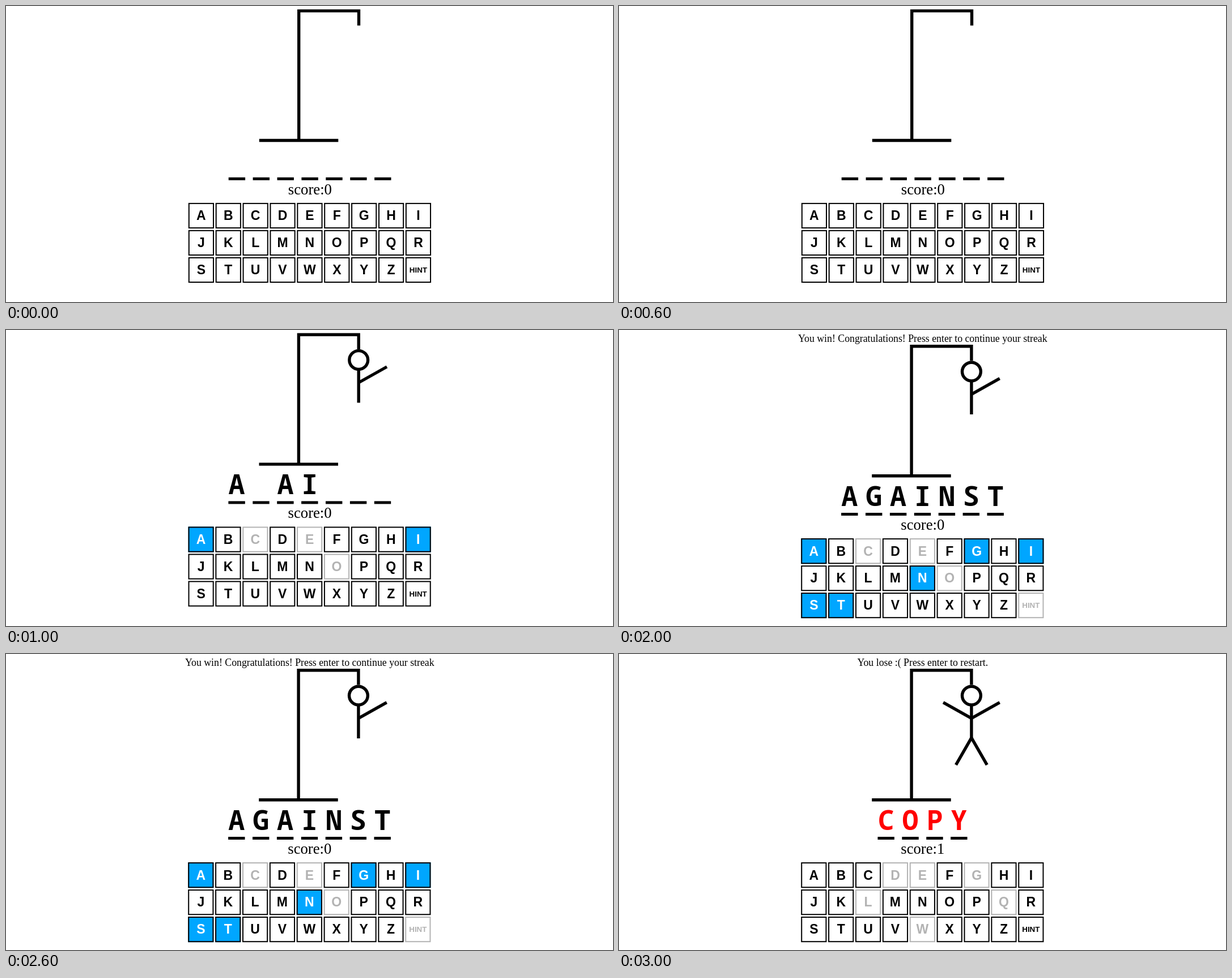
Write an HTML page with a canvas that moves like this. It is 1071 by 523 pixels and loops after 4000 ms.

```html
<!DOCTYPE html>
<html lang="en">
<head>
<meta charset="utf-8">
<title>Hangman</title>
<style>
html, body { margin: 0; width: 100%; height: 100%; overflow: hidden; background: #fff; }
canvas { display: block; width: 1071px; height: 523px; }
</style>
</head>
<body>
<canvas id="stage"></canvas>
<script>
const W = 1071, H = 523, MID = 535.8, STEP = 1000;
const BLACK = '#000', BLUE = '#00a6ff', GREY = '#b3b3b3';
const SERIF = '"Liberation Serif", "Times New Roman", serif';
const SANS = '"Liberation Sans", Arial, sans-serif';
const MONO = '"Noto Sans Mono", "DejaVu Sans Mono", monospace';
const KEYS = [...'ABCDEFGHIJKLMNOPQRSTUVWXYZ', 'HINT'];

// hit: right guesses, miss: wrong guesses, parts: body parts drawn
const states = [
  { x: 0.3, y: 0.4, word: '       ', hit: '', miss: '', parts: 0, score: 0 },
  { x: 0, y: 0, word: 'A AI   ', hit: 'AI', miss: 'CEO', parts: 3, score: 0 },
  { x: -0.3, y: 20.6, word: 'AGAINST', hit: 'AGINST', miss: 'CEO', hintUsed: true, parts: 3, score: 0,
    message: 'You win! Congratulations! Press enter to continue your streak' },
  { x: -0.3, y: 20.6, word: 'COPY', ink: '#f00', hit: '', miss: 'DEGLQW', parts: 6, score: 1,
    message: 'You lose :( Press enter to restart.' }
];

const canvas = document.getElementById('stage');
const ctx = canvas.getContext('2d');
const ratio = window.devicePixelRatio || 1;
canvas.width = W * ratio;
canvas.height = H * ratio;

function line(...points) {
  ctx.beginPath();
  for (let i = 0; i < points.length; i += 2) ctx.lineTo(points[i], points[i + 1]);
  ctx.stroke();
}

function label(text, x, y, font, color = BLACK) {
  ctx.font = font;
  ctx.fillStyle = color;
  ctx.fillText(text, x, y);
}

const body = [
  () => {
    ctx.beginPath();
    ctx.arc(622.2, 53, 16.4, 0, Math.PI * 2);
    ctx.stroke();
  },
  () => line(622.2, 69.5, 622.2, 128.5),
  () => line(622.2, 93, 672, 65),
  () => line(622.2, 93, 572.4, 65),
  () => line(622.2, 127.5, 594.8, 175.3),
  () => line(622.2, 127.5, 649.6, 175.3)
];

function drawFigure(parts) {
  ctx.strokeStyle = BLACK;
  ctx.lineWidth = 5.4;
  line(446.5, 237.1, 586, 237.1);
  line(516.4, 237.1, 516.4, 8.2, 622.2, 8.2, 622.2, 34);
  body.slice(0, parts).forEach(draw => draw());
}

function drawWord(word, ink) {
  [...word].forEach((letter, i) => {
    const x = MID + (i - (word.length - 1) / 2) * 42.9;
    ctx.fillStyle = BLACK;
    ctx.fillRect(x - 14.7, 302.4, 29.4, 5);
    label(letter, x, 290, `bold 48.3px ${MONO}`, ink);
  });
}

function drawKeys({ hit, miss, hintUsed }) {
  KEYS.forEach((key, i) => {
    const x = 321.5 + (i % 9) * 47.88;
    const y = 347.5 + Math.floor(i / 9) * 47.95;
    const isHint = key === 'HINT';
    const right = hit.includes(key);
    const spent = isHint ? hintUsed : miss.includes(key);
    if (right) {
      ctx.fillStyle = BLUE;
      ctx.fillRect(x, y, 45.2, 45.2);
    }
    ctx.lineWidth = 2;
    ctx.strokeStyle = spent ? GREY : BLACK;
    ctx.strokeRect(x + 1, y + 1, 43.2, 43.2);
    const size = isHint ? 13.4 : 23;
    const color = right ? '#fff' : spent ? GREY : BLACK;
    label(key, x + 22.6, y + 22.5 + size * 0.344, `bold ${size}px ${SANS}`, color);
  });
}

function draw(state) {
  ctx.setTransform(ratio, 0, 0, ratio, 0, 0);
  ctx.fillStyle = '#fff';
  ctx.fillRect(0, 0, W, H);
  ctx.textAlign = 'center';
  if (state.message) label(state.message, MID, 21, `17.8px ${SERIF}`);
  ctx.translate(state.x, state.y);
  drawFigure(state.parts);
  drawWord(state.word, state.ink);
  label('score:' + state.score, MID + 0.3, 332.3, `26.7px ${SERIF}`);
  drawKeys(state);
}

const start = performance.now();

function tick() {
  const time = Math.max(0, performance.now() - start);
  draw(states[Math.floor(time / STEP) % states.length]);
  requestAnimationFrame(tick);
}

tick();
</script>
</body>
</html>
```
